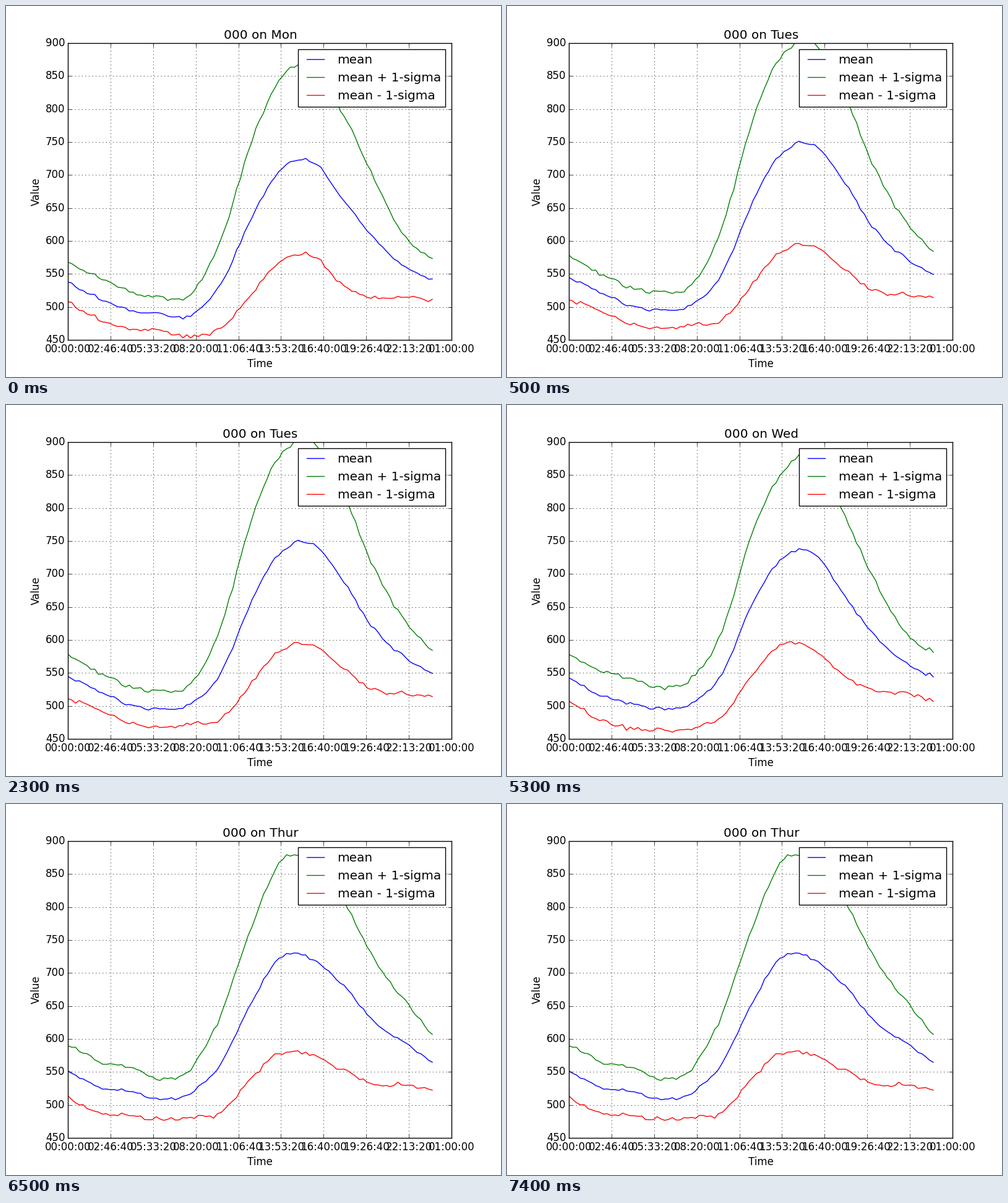
These frames come from a looping animation (800x600 px, 8 s). A matplotlib script:

```python
import matplotlib.pyplot as plt
import numpy as np
from matplotlib.animation import FuncAnimation
from matplotlib.transforms import Affine2D

plt.style.use("classic")
plt.rcParams["font.family"] = "DejaVu Sans"

SAMPLES = np.arange(96)
SECONDS = SAMPLES * 900
KEY_GAP = 8  # samples between key points, i.e. two hours
JITTER = 1.8
TICK_MS = 500
LOOP_TICKS = 16

rng = np.random.default_rng(7)


def curve(*keys):
    """Smooth curve through two-hourly key points, with measurement jitter."""
    keys = np.array(keys, float)
    slopes = np.gradient(keys)
    i, t = SAMPLES // KEY_GAP, SAMPLES % KEY_GAP / KEY_GAP
    ease = t * t * (3 - 2 * t)
    smooth = (keys[i] * (1 - ease) + keys[i + 1] * ease
              + slopes[i] * t * (1 - t) ** 2
              - slopes[i + 1] * t * t * (1 - t))
    return smooth + rng.normal(0, JITTER, len(SAMPLES))


def clock(seconds, _pos=None):
    s = int(seconds)
    return f"{s // 3600 % 24:02d}:{s // 60 % 60:02d}:{s % 60:02d}"


def nudge(texts, dx):
    """Shift texts sideways by dx pixels."""
    for text in texts:
        text.set_transform(text.get_transform() + Affine2D().translate(dx, 0))


# Start tick, name, upper and lower curve of each day
DAYS = [
    (0, "Mon",
     curve(568, 545, 525, 516, 520, 604, 752, 850, 862, 790, 692, 605, 568),
     curve(510, 481, 467, 465, 456, 468, 521, 572, 577, 532, 514, 515, 509)),
    (1, "Tues",
     curve(577, 550, 530, 524, 534, 622, 785, 887, 898, 819, 706, 629, 575),
     curve(512, 494, 474, 468, 473, 480, 536, 586, 592, 555, 525, 518, 516)),
    (7, "Wed",
     curve(576, 555, 542, 528, 541, 615, 767, 857, 877, 787, 688, 610, 578),
     curve(507, 480, 467, 464, 466, 485, 549, 596, 585, 545, 523, 519, 508)),
    (13, "Thur",
     curve(592, 566, 557, 540, 556, 639, 771, 872, 865, 807, 720, 655, 600),
     curve(513, 488, 485, 477, 480, 489, 543, 580, 576, 551, 531, 530, 521)),
]

fig, ax = plt.subplots(figsize=(8, 6), dpi=100, facecolor="white")
mean_line, = ax.plot([], [], "b", label="mean")
high_line, = ax.plot([], [], "g", label="mean + 1-sigma")
low_line, = ax.plot([], [], "r", label="mean - 1-sigma")
title = ax.set_title("")
ax.set(xlim=(0, 90000), ylim=(450, 900), xlabel="Time")
ax.set_ylabel("Value", labelpad=4.3)
ax.set_xticks(range(0, 90001, 10000))
ax.set_yticks(range(450, 901, 50))
ax.xaxis.set_major_formatter(clock)
ax.grid(True)
legend = ax.legend(loc="upper right", handletextpad=0.75)

# Align text by its ink rather than its advance width
nudge([title, *ax.get_yticklabels(), *legend.get_texts()[1:]], 1)
nudge(ax.get_xticklabels(), 0.5)


def draw(tick):
    _, name, high, low = [day for day in DAYS if day[0] <= tick][-1]
    mean_line.set_data(SECONDS, (high + low) / 2)
    high_line.set_data(SECONDS, high)
    low_line.set_data(SECONDS, low)
    title.set_text(f"000 on {name}")
    return mean_line, high_line, low_line, title


anim = FuncAnimation(fig, draw, frames=LOOP_TICKS, interval=TICK_MS,
                     repeat=True, repeat_delay=0)
plt.show()
```
